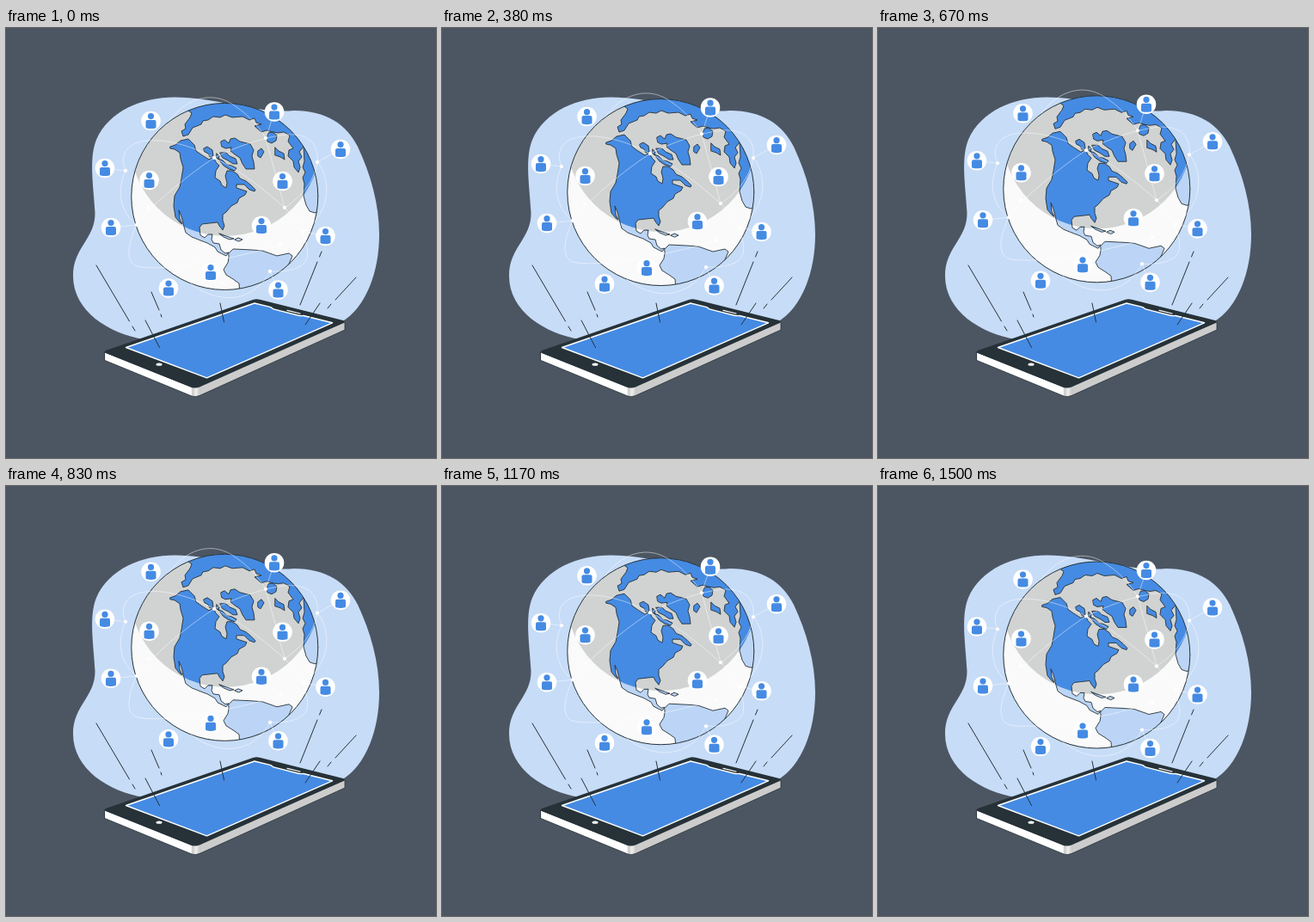
Recreate the animation shown at these times as an HTML page with a canvas. Size 500 by 500 pixels, loop 1540 ms.

```html
<!DOCTYPE html>
<html lang="en">
<head>
<meta charset="utf-8">
<title>Global network</title>
<style>
html, body { margin: 0; width: 100%; height: 100%; overflow: hidden; background: #4c5662; }
canvas { display: block; width: 500px; height: 500px; }
</style>
</head>
<body>
<canvas id="stage" width="500" height="500"></canvas>
<script>
const ctx = document.getElementById('stage').getContext('2d');
const BLUE = '#458be3', PALE = '#c7dcf7', INK = '#263238';
const LOOP = 1540, RISE = 10, LEAD = 40;
const GLOBE = { x: 254.3, y: 196, r: 108.5 };

const disc = (x, y, r) => {
  const p = new Path2D();
  p.arc(x, y, r, 0, Math.PI * 2);
  return p;
};
const globe = disc(GLOBE.x, GLOBE.y, GLOBE.r);
const shade = disc(255, 131, 111);

const blob = new Path2D('M196 80.500C158 80.500 120 96 105 130C96 152 102 185 103.500 215C104 245 78 255 78 288C78 330 120 355 160 362L250 380L390 342C419 325 434 283 434 240C434 205 424 170 409 138C396 112 372 96 335 96C290 100 246 80.500 196 80.500Z');

const atlantic = 'M191 138L197 136L203 131L212 129L219 136L221 143L228 148L236 153L241 150L244 156L248 160L244 166L243 174L249 178L251 183L256 186L257 180L255 172L257 166L263 166L269 170L272 175L279 178L285 183L290 188L289 190L283 188L277 182L268 182L268 186L280 190L278 194L271 198L269 203L262 207L256 214L252 217L252 224L254 230L252 235L248 230L246 226L237 227L228 228L225 232L226 241L231 244L235 240L240 240L239 246L241 250L248 251L250 258L255 262L259 261';
const pacific = 'L256 265L250 262L246 260L243 255L234 250L226 247L216 243L209 238L207 231L204 219L201 212L202 222L205 228L202 226L197 220L195 207L196 195L202 185L204 175L206 162L203 152L202 145L196 141L191 140Z';
const lands = new Path2D([
  atlantic + pacific,
  // South America
  'M259 262L264 257L285 258L298 259L315 265L329 262L333 265L330 272L326 281L310 310H272L271 297L264 292L256 287L253 281L258 273L259 267Z',
  // Eurasia and Africa
  'M209 94L216 99L214 104L208 112L209 117L204 120L206 126L212 124L217 116L227 112L229 108L235 107L241 103L249 104L255 101L263 104L275 103L283 107L289 105L291 110L297 112L289 114L297 121L303 119L310 121L316 122L323 121L330 125L328 132L334 140L329 142L328 149L334 155L335 162L340 168L342 162L340 155L344 150L341 144L346 138L347 155L345 162L348 168L345 174L347 181L346 195L349 206L353 213L359 215L375 210V80H209Z',
  // Greenland and Iceland
  'M250 132L254 130L259 134L261 129L266 128L272 132L284 135L288 142L286 149L288 156L289 164L279 164L275 158L272 151L266 147L261 143L262 139L255 140L251 138Z',
  'M293 143L297 140L300 144L296 151L293 149Z',
  // Arctic islands
  'M230 140L234 138L240 142L241 149L237 150L235 146L231 144Z',
  'M245 146L248 149L247 153L245 151Z',
  'M249 145L256 145L260 149L267 152L269 158L264 158L258 154L252 151Z',
  'M247 152L252 154L257 159L262 160L268 163L266 166L259 164L253 160Z',
  // Northern Europe
  'M303 127L305 122L310 121L315 125L314 131L309 134L304 132Z',
  'M313 139L317 143L323 146L324 153L319 150L313 148Z',
  // Caribbean
  'M248 239L256 242L265 245L260 246L253 243Z',
  'M266 246L270 244L275 246L271 248Z'
].join(''));

const links = new Path2D([
  'M190 108C208 83 240 70 268 92C283 102 294 115 302 128',
  'M139 166C132 150 138 133 165 131C190 129 220 139 242 151C275 167 300 188 324 209C345 230 355 258 349 270C343 281 325 284 307 283',
  'M152 229C142 250 138 272 152 277C180 284 260 270 319 252',
  'M152 229C160 215 205 175 242 151C270 137 300 127 325 124C352 122 364 135 362 156C358 180 342 197 324 209',
  'M139 166C128 190 133 215 152 229',
  'M362 156C375 170 383 210 346 237',
  'M215 297C240 318 285 325 307 283',
  'M115 163L139 166M122 232L152 229M312 98L302 128L324 209M389 141L362 156M307 283L316 304M346 237L371 242'
].join(''));

const nodes = [[139, 166], [152, 229], [166, 209], [242, 151], [302, 128], [362, 156],
  [324, 209], [346, 237], [319, 252], [307, 283]];
const people = [[168.5, 108], [312, 97.5], [389, 141], [115, 163], [166.5, 177], [321.5, 178],
  [122, 232], [297, 230], [371.5, 242], [238, 284], [189, 302.5], [316.5, 304.5]];
const body = new Path2D('M-4 -1H4Q6 -1 6 1V7.200Q6 8.200 5 8.500Q0 9.700 -5 8.500Q-6 8.200 -6 7.200V1Q-6 -1 -4 -1Z');

const rays = new Path2D('M105 276L143.500 341M147 347L150 352M169 307L178 328M180 333L181 336M162 340L178.500 371.500M249 320L253.500 342M367 260L364.500 266M362 272L342 322M407 290L383 316M378 321L374 326M365 320L348 345');

function fill(path, color) {
  ctx.fillStyle = color;
  ctx.fill(path);
}

function stroke(path, color, width) {
  ctx.strokeStyle = color;
  ctx.lineWidth = width;
  ctx.stroke(path);
}

function drawGlobe() {
  ctx.save();
  ctx.clip(globe);
  fill(globe, '#fafafa');
  fill(lands, '#bcd5f6');
  ctx.save();
  ctx.clip(shade);
  fill(globe, '#d1d3d2');
  fill(lands, BLUE);
  ctx.restore();
  stroke(lands, INK, 0.9);
  ctx.restore();
  stroke(globe, INK, 1);
}

function drawNetwork() {
  stroke(links, 'rgba(255,255,255,.6)', 0.8);
  for (const [x, y] of nodes) fill(disc(x, y, 2.1), '#fff');
  for (const [x, y] of people) {
    ctx.save();
    ctx.translate(x, y);
    fill(disc(0, 0, 11.3), '#fff');
    fill(disc(0, -5.4, 3.6), BLUE);
    fill(body, BLUE);
    ctx.restore();
  }
}

const phone = {
  side: new Path2D('M115 377L217 418L394 342V351L225 427.500Q220 429.500 216 428L115 386.500Z'),
  top: new Path2D('M116 375L287 316Q291 314.500 295 315.700L392 340Q395 341.500 392 343L225 417.500Q220 419.500 215 417.500L116 378Q113.500 376.500 116 375Z'),
  screen: new Path2D('M139.500 371.500L289 320L307 324.400Q309 325 310 326.200Q311 327 313 327.400L340 334.200Q343 334.900 346 334.500L379.500 342.800L233.500 406.800Z'),
  button: new Path2D('M174.500 391.200A3.500 1.600 0 1 0 181.500 391.200A3.500 1.600 0 1 0 174.500 391.200Z'),
  speaker: new Path2D('M327 328.300L342 332')
};
const metal = ctx.createLinearGradient(215, 0, 228, 0);
metal.addColorStop(0, '#fff');
metal.addColorStop(0.15, '#c8c8c8');
metal.addColorStop(0.45, '#f0f0f0');
metal.addColorStop(0.8, '#c9c9c9');
metal.addColorStop(1, '#cccccc');

function drawPhone() {
  fill(phone.side, metal);
  stroke(phone.side, INK, 0.8);
  fill(phone.top, INK);
  fill(phone.screen, BLUE);
  stroke(phone.screen, '#fff', 1.4);
  fill(phone.button, '#fff');
  stroke(phone.speaker, '#fff', 1.2);
}

function frame(now) {
  const phase = ((now + LEAD) % LOOP) / LOOP;
  const lift = RISE * (1 - Math.abs(2 * phase - 1));

  ctx.fillStyle = '#4c5662';
  ctx.fillRect(0, 0, 500, 500);
  ctx.lineJoin = ctx.lineCap = 'round';
  fill(blob, PALE);
  drawPhone();
  stroke(rays, INK, 1);

  ctx.save();
  ctx.translate(0, 0.5 - lift);
  drawGlobe();
  drawNetwork();
  ctx.restore();
  requestAnimationFrame(frame);
}
requestAnimationFrame(frame);
</script>
</body>
</html>
```
